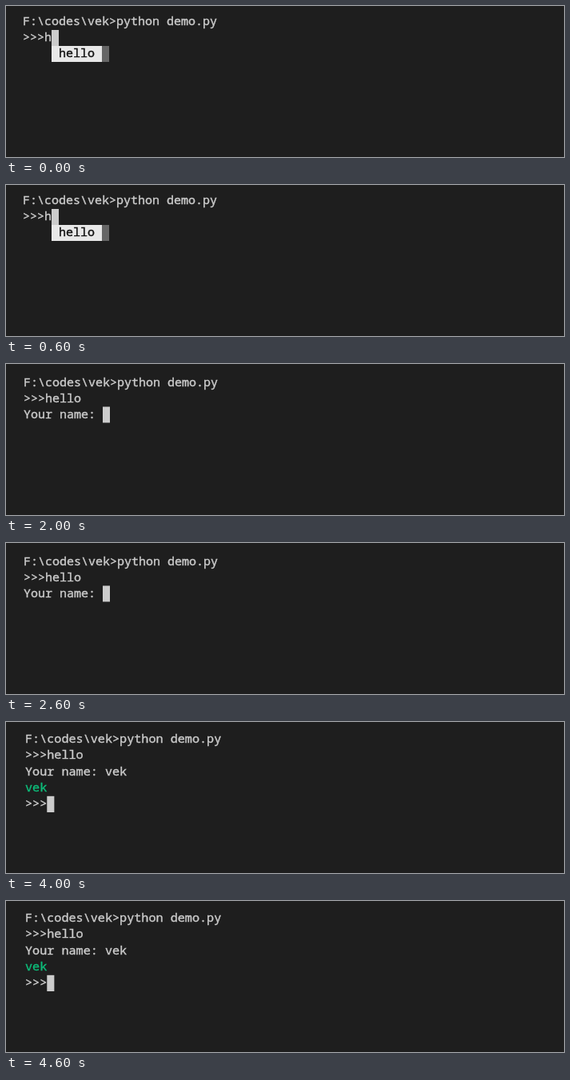
Write an HTML page that moves like this. It is 698 by 189 pixels and loops after 5000 ms.

```html
<!DOCTYPE html>
<html lang="en">
<head>
<meta charset="utf-8">
<title>Terminal prompt demo</title>
<style>
  html, body { margin: 0; width: 100%; height: 100%; overflow: hidden; background: #1e1e1e; }
  svg { display: block; width: 698px; height: 189px; }
  text {
    font: 15px "Noto Sans Mono", "DejaVu Sans Mono", monospace;
    font-variant-ligatures: none;
    white-space: pre;
    stroke-width: 0.4px;
  }
</style>
</head>
<body>
<svg id="stage" viewBox="0 0 698 189"></svg>
<script>
const NS = "http://www.w3.org/2000/svg";
const CELL = 9, ROW = 20, BASELINE = 14, STEP_MS = 1000;
const LIGHT = "#ccc", GREY = "#666", GREEN = "#0dbc79";
const NAME = "vek";
const COMMAND = `F:\\codes\\${NAME}>python demo.py`;
const stage = document.getElementById("stage");

// x, y: top left of the text grid; cursor: [column, row]
const steps = [
  { x: 21, y: 10, lines: [COMMAND, ">>>h"], cursor: [4, 1],
    menu: { bar: "#e8e8e8", ink: "#111" } },
  { x: 28, y: 16, lines: [COMMAND, ">>>hello"], cursor: [8, 1],
    menu: { bar: GREY, ink: "#fff" }, edge: true },
  { x: 22, y: 13.5, lines: [COMMAND, ">>>hello", "Your name: "], cursor: [11, 2] },
  { x: 22, y: 13.5, lines: [COMMAND, ">>>hello", "Your name: " + NAME], cursor: [14, 2] },
  { x: 24, y: 12, scale: 1.01, lines: [COMMAND, ">>>hello", "Your name: " + NAME, NAME, ">>>"],
    cursor: [3, 4], greenRow: 3 }
];

function add(parent, tag, attrs, content = "") {
  const el = document.createElementNS(NS, tag);
  for (const key in attrs) el.setAttribute(key, attrs[key]);
  el.textContent = content;
  return parent.appendChild(el);
}

const box = (parent, x, y, width, height, fill) =>
  add(parent, "rect", { x, y, width, height, fill });

function buildScreen({ x, y, scale = 1, lines, cursor, menu, edge, greenRow }) {
  const screen = add(stage, "g", { visibility: "hidden" });
  if (edge) {
    box(screen, 0, 0, 3, 143, "#252526");
    box(screen, 0, 143, 3, 46, "#3a3a3a");
  }

  const grid = add(screen, "g", { transform: `translate(${x} ${y}) scale(${scale})` });
  const cells = (col, row, count, fill) =>
    box(grid, col * CELL, row * ROW, count * CELL, ROW, fill);
  const write = (col, row, content, ink) =>
    add(grid, "text", { x: col * CELL, y: row * ROW + BASELINE, fill: ink, stroke: ink }, content);

  lines.forEach((line, row) => write(0, row, line, row === greenRow ? GREEN : LIGHT));
  cells(...cursor, 1, LIGHT);
  if (menu) {
    cells(4, 2, 8, GREY);
    cells(4, 2, 7, menu.bar);
    write(5, 2, "hello", menu.ink);
  }
  return screen;
}

const screens = steps.map(buildScreen);
let shown = -1;
const start = performance.now();

function draw() {
  const t = Math.max(0, performance.now() - start);
  const now = Math.floor(t / STEP_MS) % screens.length;
  if (now !== shown) {
    screens.forEach((g, i) => g.setAttribute("visibility", i === now ? "visible" : "hidden"));
    shown = now;
  }
  requestAnimationFrame(draw);
}
draw();
</script>
</body>
</html>
```
